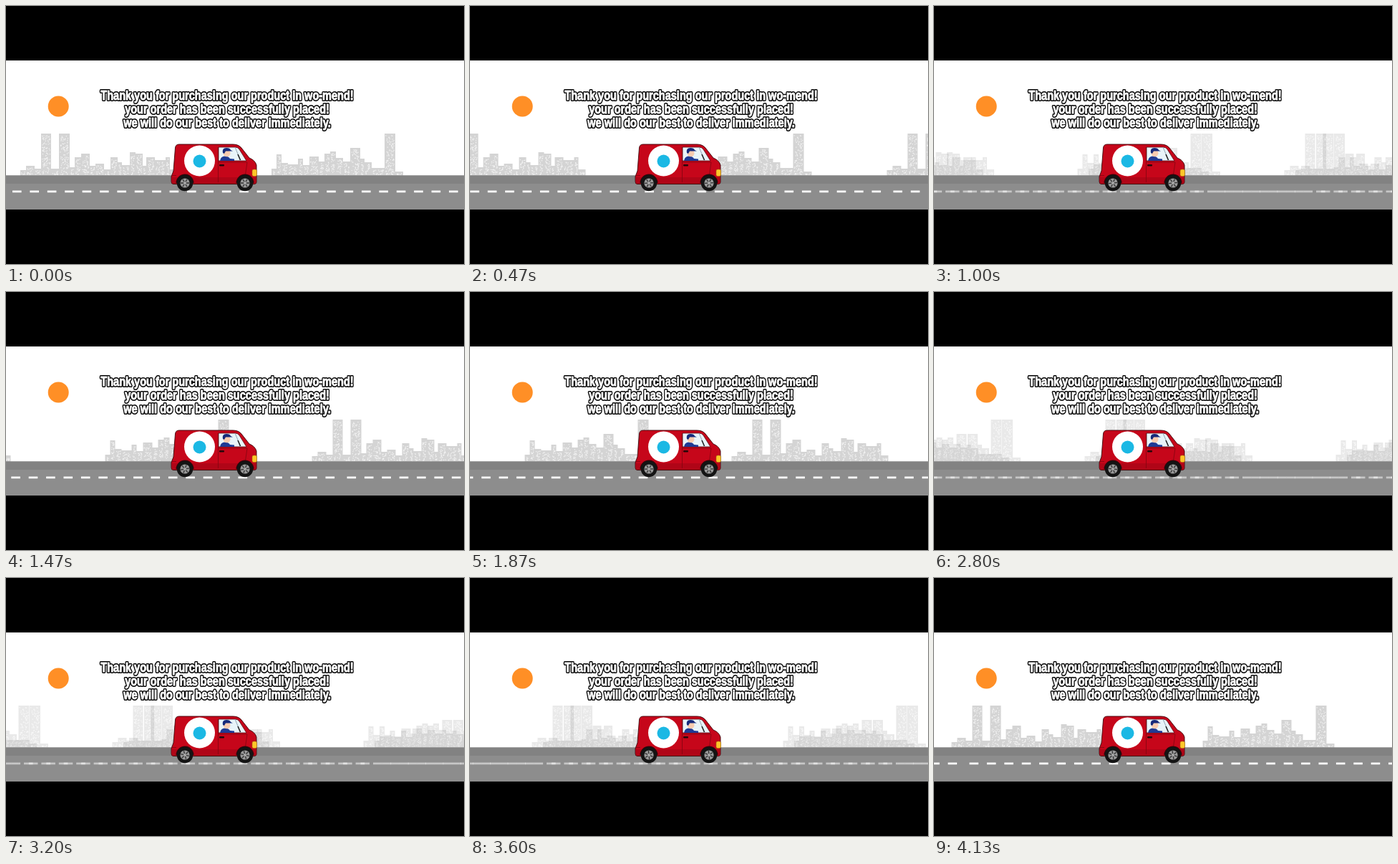
An HTML page that plays this animation: 640x360 px, repeating every 4190 ms.

```html
<!DOCTYPE html>
<html lang="en">
<head>
<meta charset="utf-8">
<title>Order placed</title>
<style>
  html, body { margin: 0; width: 100%; height: 100%; overflow: hidden; background: #000; }
  svg { display: block; width: 100vw; height: 100vh; }
  #message { font: 900 17.5px Impact, "Liberation Sans", sans-serif; text-anchor: middle; }
  .outline { fill: #000; stroke: #000; stroke-width: 4px; stroke-linejoin: round; }
  .letters { fill: #fff; stroke: #fff; stroke-width: .9px; }
  .city { mix-blend-mode: multiply; }
</style>
</head>
<body>
<svg viewBox="0 0 640 360">
  <defs>
    <g id="cityTile">
      <path id="blocks" fill="#d4d4d4"/>
      <path id="windows" fill="#f2f2f2"/>
    </g>
    <path id="dashTile" fill="#fff"/>
    <g id="wheel">
      <circle r="11.3" fill="#141414"/>
      <circle r="6.6" fill="#999"/>
      <path class="spokes" d="M-6 0H6M-3-5.2L3 5.2M-3 5.2L3-5.2" stroke="#333" stroke-width="1.3"/>
      <circle r="2" fill="#aaa"/>
    </g>
    <g id="message" transform="translate(309 0) scale(.83 1)">
      <text y="131">Thank you for purchasing our product in wo-mend!</text>
      <text y="150">your order has been successfully placed!</text>
      <text y="169">we will do our best to deliver immediately.</text>
    </g>
  </defs>

  <rect width="640" height="360"/>
  <rect y="76" width="640" height="161" fill="#fff"/>
  <circle cx="73.2" cy="140" r="14.5" fill="#ff8f26"/>

  <g class="city"><use href="#cityTile"/><use href="#cityTile" x="640"/></g>
  <g class="city"><use href="#cityTile"/><use href="#cityTile" x="640"/></g>

  <rect y="236.5" width="640" height="47.5" fill="#8d8d8d"/>
  <rect y="236.5" width="640" height="11.5" fill="#828282"/>
  <g class="road"><use href="#dashTile"/><use href="#dashTile" x="640"/></g>
  <g class="road"><use href="#dashTile"/><use href="#dashTile" x="640"/></g>

  <g id="van">
    <path d="M236.500 198Q237 193 242 193H317Q325 193 329 198L340 212Q348 215 350 222V246Q350 248.500 346 248.500H234Q231 248.500 231 245V238L234 230Z"
          fill="#c6061a" stroke="#3a0409" stroke-width=".9"/>
    <path d="M231.500 239H349.500V246Q349.500 248 346 248H234Q231.500 248 231.500 245Z" fill="#b00517"/>
    <path d="M231 236.500H238M296.500 197V246M297 218H337L333 246" fill="none" stroke="#820611" stroke-width=".8"/>
    <path d="M297 197H320Q324 197 326 200L336 216H297Z" fill="#e8f4f9" stroke="#5a0a12" stroke-width=".8"/>
    <path d="M320 197L328 216" stroke="#8fa6b4"/>
    <path d="M299 216Q300 209.500 306 209.500Q311 209.500 313 213L319 213.500V216Z" fill="#1f3a94"/>
    <ellipse cx="308.500" cy="205.500" rx="5" ry="4.800" fill="#f8ccb0"/>
    <path d="M303 205Q301.500 198 308 198Q313 198 314 201L317 202.500H307L305 206Z" fill="#15297a"/>
    <path d="M324 207L327.500 215" stroke="#222" stroke-width="1.600"/>
    <rect x="298" y="221" width="7" height="2.400" rx="1" fill="#26070a"/>
    <rect x="344" y="228" width="6.500" height="9.500" rx="2" fill="#ffc629" stroke="#a06a10" stroke-width=".6"/>
    <circle cx="270.500" cy="216" r="21.500" fill="#fff"/>
    <circle cx="270.500" cy="216.500" r="9" fill="#1bb8e4"/>
    <path d="M237.500 247A12.500 12.500 0 0 1 262.500 247M321.500 247A12.500 12.500 0 0 1 346.500 247" fill="#32060a"/>
    <use href="#wheel" transform="translate(250 247)"/>
    <use href="#wheel" transform="translate(334 247)"/>
  </g>

  <use class="outline" href="#message"/>
  <use class="letters" href="#message"/>
</svg>
<script>
const LOOP = 4190, FRAME = 200 / 3, TILE = 640;
const SCENE_STEP = 15.5, ROAD_RATIO = 9, WHEEL_RADIUS = 11.3;
const GROUND = 237;
const all = selector => [...document.querySelectorAll(selector)];

let seed = 17;
const random = () => (seed = (seed * 16807) % 2147483647) / 2147483647;

const box = (x, y, w, h) => `M${x.toFixed(1)} ${y.toFixed(1)}h${w}v${h}h${-w}z`;

// Each pair is the width and height of neighbouring buildings.
const districts = [
  { x: 20, pairs: [[8, 8], [12, 14], [9, 10], [14, 59], [11, 10], [15, 59], [7, 12], [9, 26],
    [12, 31], [8, 14], [12, 17], [9, 9], [10, 26], [6, 19], [11, 15], [8, 33], [10, 31],
    [5, 14], [12, 26], [15, 22], [6, 26], [10, 9]] },
  { x: 371, pairs: [[7, 10], [7, 30], [9, 18], [14, 16], [7, 24], [9, 15], [13, 27], [8, 20],
    [8, 31], [8, 34], [10, 25], [10, 20], [14, 39], [6, 24], [10, 19], [18, 11], [15, 59], [11, 6]] }
];

function buildCity() {
  let blocks = "", windows = "";
  for (const { x: start, pairs } of districts) {
    let x = start;
    for (const [w, h] of pairs) {
      blocks += box(x, GROUND - h, w, h);
      for (let i = 0; i < w * h / 8; i++) {
        windows += box(x + 1 + random() * (w - 3), GROUND - h + 2 + random() * (h - 4), 1.2, 1.2);
      }
      x += w;
    }
  }
  document.getElementById("blocks").setAttribute("d", blocks);
  document.getElementById("windows").setAttribute("d", windows);
}

function buildRoad() {
  let dashes = "";
  for (let i = 0; i < 26; i++) dashes += box(9 + i * 24.4, 257.6, 12.6, 2.6);
  document.getElementById("dashTile").setAttribute("d", dashes);
}

buildCity();
buildRoad();
const cities = all(".city"), roads = all(".road"), spokes = all(".spokes");

function place(layer, distance, opacity) {
  layer.setAttribute("transform", `translate(${-(distance % TILE).toFixed(2)} 0)`);
  layer.setAttribute("opacity", opacity);
}

// The scene advances twice in three frames; every third frame mixes two poses.
function draw(time) {
  const step = Math.min(62, Math.floor((time % LOOP + 3.4) / FRAME));
  const mixed = step > 0 && step % 3 === 0;
  const pose = Math.round(step / 1.5);
  for (const i of [0, 1]) {
    const distance = (pose + i) * SCENE_STEP;
    const opacity = mixed ? 0.5 : 1 - i;
    place(cities[i], distance, opacity);
    place(roads[i], distance * ROAD_RATIO, opacity);
  }
  const angle = pose * SCENE_STEP * ROAD_RATIO / WHEEL_RADIUS * 180 / Math.PI;
  spokes.forEach(s => s.setAttribute("transform", `rotate(${(angle % 360).toFixed(1)})`));
}

const began = performance.now();
function tick() {
  draw(performance.now() - began);
  requestAnimationFrame(tick);
}
tick();
</script>
</body>
</html>
```
